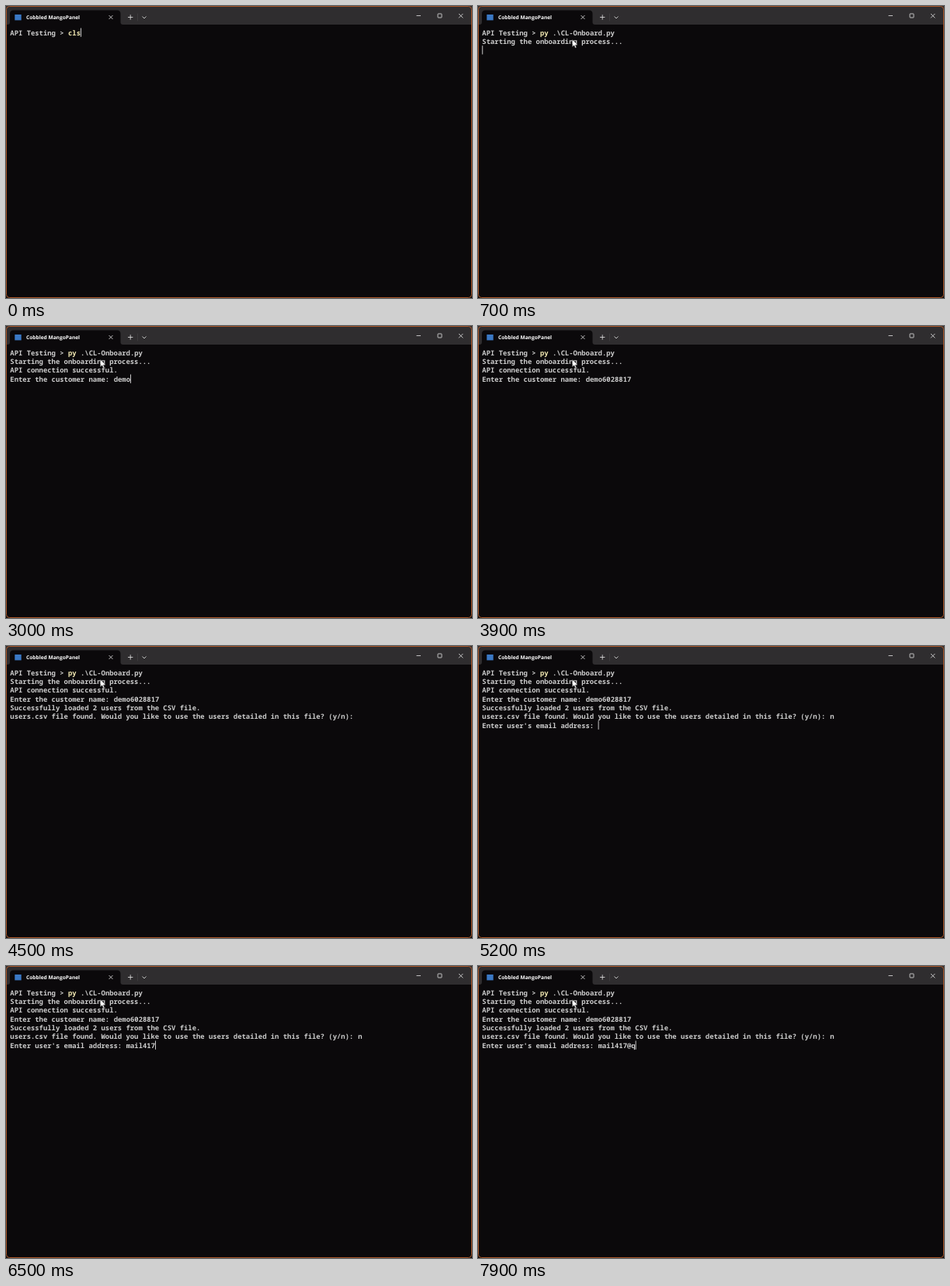
Animation, 600 px wide and 377 px high, one loop 8000 ms. Source, as an HTML page:

```html
<!DOCTYPE html>
<html lang="en">
<head>
<meta charset="utf-8">
<title>Terminal onboarding</title>
<style>
  html, body { margin: 0; width: 100%; height: 100%; overflow: hidden; background: #0b090b; }
  svg { display: block; width: 600px; height: 377px; }
  text { white-space: pre; text-rendering: geometricPrecision; }
  .title { font: 700 6.6px "Open Sans", "Noto Sans", sans-serif; fill: #fff; }
  .term text { font: 600 8.889px "Noto Sans Mono", "DejaVu Sans Mono", monospace; fill: #ccc; }
  .term .cmd { fill: #f4ebb4; }
  .glyph { fill: none; stroke: #e6e6e6; stroke-width: .8; }
</style>
</head>
<body>
<svg viewBox="0 0 600 377" xmlns="http://www.w3.org/2000/svg">
  <rect width="600" height="377" fill="#0b090b"/>
  <rect width="600" height="24" fill="#2f2d2f"/>
  <path d="M2 24Q5 24 5 21V10Q5 5.500 9.500 5.500H143Q147.500 5.500 147.500 10V21Q147.500 24 150.500 24Z" fill="#0b090b"/>
  <rect x="11.300" y="11" width="8.400" height="7.400" fill="#3a78c4"/>
  <text class="title" x="26" y="17.300">Cobbled MangoPanel</text>
  <g class="glyph">
    <path d="M132.500 12l5 5m0-5l-5 5"/>
    <path d="M157 14.500h6.400m-3.200-3.200v6.400"/>
    <path d="M169.500 9.500v10" stroke="#454345" stroke-width=".6"/>
    <path d="M175.500 13.500l2.500 2.500l2.500-2.500"/>
    <path d="M528.500 12.500h5.500"/>
    <rect x="556" y="10" width="5" height="5" rx=".6"/>
    <path d="M583 10l5.400 5.400m0-5.400l-5.400 5.400"/>
  </g>
  <g class="term" id="term"></g>
  <rect id="caret" width=".9" height="11.300" fill="#dcdcdc"/>
  <path id="mouse" d="M121.400 43v9.900l2.300-2.100l1.500 3.400l1.600-.7l-1.500-3.300h3.100Z" fill="#fff" stroke="#111" stroke-width=".5"/>
  <rect x=".5" y=".5" width="599" height="376" rx="4" fill="none" stroke="#a85628"/>
</svg>
<script>
const LOOP = 8000, BLINK = 265, KEY = 90;
const CELL = 16 / 3, ROW = 34 / 3, LEFT = 5.33, TOP = 28.5;
const term = document.getElementById('term');
const caret = document.getElementById('caret');
const mouse = document.getElementById('mouse');
const events = [];
let row = 0, col = 0;

const xAt = c => LEFT + c * CELL;
const yAt = r => TOP + r * ROW;
const show = (el, on) => el.setAttribute('visibility', on ? 'visible' : 'hidden');

function addText(text, cls) {
  const el = document.createElementNS('http://www.w3.org/2000/svg', 'text');
  el.setAttribute('x', xAt(col));
  el.setAttribute('y', yAt(row) + 9.3);
  el.setAttribute('class', cls);
  el.textContent = text;
  term.append(el);
  return el;
}

// Prints at the pen; each newline moves the pen to the next row.
function print(at, text, cls = '', until = LOOP) {
  text.split('\n').forEach((part, i) => {
    if (i) { row++; col = 0; }
    const el = addText(part, cls);
    col += part.length;
    events.push({ at, until, el, row, col });
  });
}

function type(at, text) {
  [...text].forEach((ch, i) => print(at + i * KEY, ch));
}

print(0, 'API Testing > ');
const home = col;
print(0, 'cls', 'cmd', 100);
col = home;
print(100, 'py ', 'cmd');
print(100, '.\\CL-Onboard.py');
print(500, '\n');
print(600, 'Starting the onboarding process...\n');
print(1400, 'API connection successful.\n');
print(2400, 'Enter the customer name: ');
type(2700, 'demo6028817');
print(4200, '\nSuccessfully loaded 2 users from the CSV file.');
print(4200, '\nusers.csv file found. Would you like to use the users detailed in this file? (y/n): ');
type(5000, 'n');
print(5200, "\nEnter user's email address: ");
type(5800, 'mail');
type(6300, '417');
print(6740, ''); // Shift goes down and restarts the blink
type(7100, '@');
type(7900, 'q');

function draw(t) {
  for (const e of events) show(e.el, t >= e.at && t < e.until);
  const last = events.findLast(e => e.at <= t);
  caret.setAttribute('x', xAt(last.col));
  caret.setAttribute('y', yAt(last.row));
  show(caret, Math.floor((t - last.at) / BLINK) % 2 === 0);
  show(mouse, t >= 200);
}

function tick() {
  draw(performance.now() % LOOP);
  requestAnimationFrame(tick);
}
draw(0);
requestAnimationFrame(tick);
</script>
</body>
</html>
```
